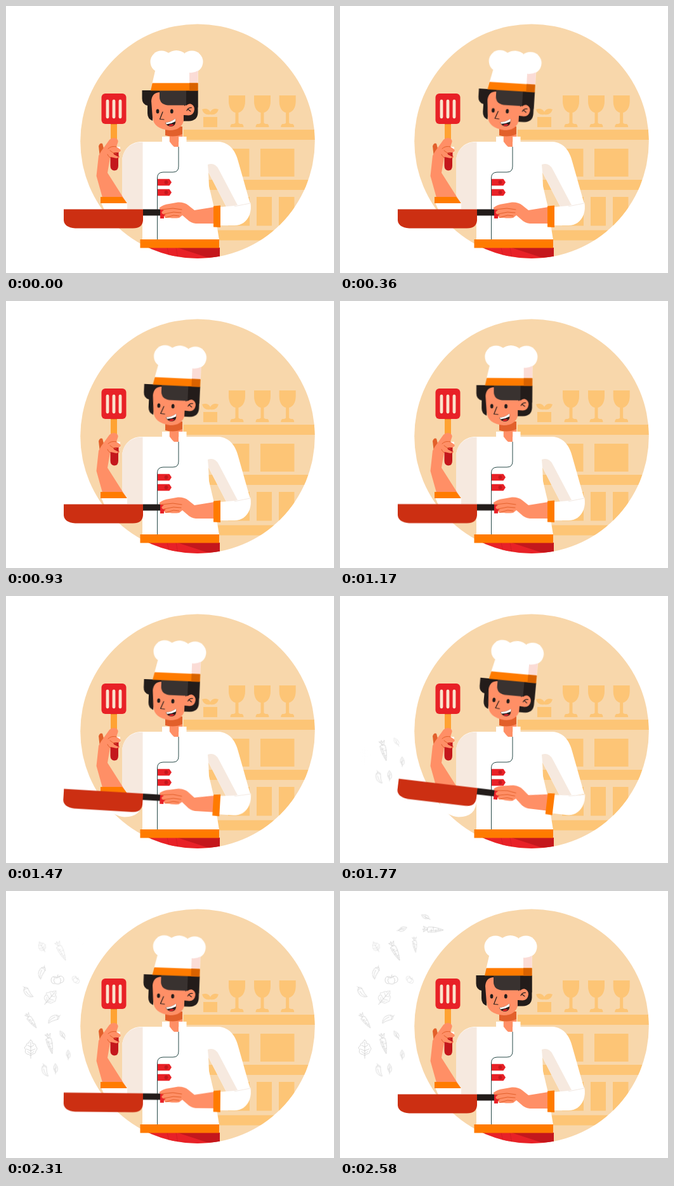
Write an HTML page that moves like this. It is 517 px wide and 421 px high and loops after 3630 ms.

```html
<!DOCTYPE html>
<html lang="en">
<head>
<meta charset="utf-8">
<title>Chef</title>
<style>
html, body { margin: 0; width: 100%; height: 100%; overflow: hidden; background: #fff; }
svg { display: block; width: 100vw; height: 100vh; }
.head, .pan, .herbs { animation: nod 3630ms linear infinite; }
.head { transform-origin: 264px 205px; }
.pan { animation-name: toss; transform-origin: 365px 318px; }
.herbs { animation-name: rise; fill: none; stroke: #c9c9c9; stroke-width: .7; stroke-linecap: round; stroke-linejoin: round; }
.herbs use { opacity: 0; }
@keyframes nod {
  0%, 33.47%, 71.07%, 100% { transform: rotate(0deg); }
  16.53%, 50.41% { transform: rotate(5.85deg); }
}
@keyframes toss {
  0%, 32.1%, 65%, 100% { transform: rotate(0deg); }
  48.76% { transform: rotate(6.8deg); }
}
@keyframes rise {
  0%, 41% { transform: translateY(7px); animation-timing-function: ease-out; }
  61%, 100% { transform: translateY(0); }
}
.skin { fill: #ff8f66; }
.deep { fill: #e2602b; }
.white { fill: #fff; }
.shade { fill: #f6e9df; }
.orange { fill: #ff7b00; }
.red { fill: #e82127; }
.wine { fill: #c4171c; }
.ink { fill: #231c1a; }
.line { fill: none; stroke: #231c1a; stroke-width: 1.2; stroke-linecap: round; stroke-linejoin: round; }
.crease { fill: none; stroke: #e2602b; stroke-width: 1; stroke-linecap: round; }
</style>
</head>
<body>
<svg viewBox="0 0 517 421" preserveAspectRatio="none">
  <defs>
    <clipPath id="disc"><circle cx="302" cy="213.3" r="184.8"/></clipPath>
    <g id="glass">
      <path d="M-13 141H13V150C13 161 8 167 2.5 168V184Q3 186 8 186Q10.500 187 10.500 191H-10.500Q-10.500 187 -8 186Q-3 186 -2.500 184V168C-8 167 -13 161 -13 150Z"/>
    </g>
    <g id="button">
      <path class="red" d="M239 0H257.500L261 5.300L257.500 10.600H239Z"/>
      <circle class="wine" cx="252.500" cy="5.300" r="2.900"/>
    </g>
    <g id="carrot">
      <path d="M-4 -8Q0 -11 4 -8Q5 2 0 16Q-5 2 -4 -8ZM-3 -3H1M4 0H0M-3 4H0M2 8H0M0 -9L-4 -16L-2 -14L0 -17L1 -13L5 -16L2 -9M0 -9V-14M-2 -6L0 12"/>
    </g>
    <g id="chili">
      <path d="M-2 -9Q3 -10 3 -5Q3 4 6 10Q-5 8 -5 -3Q-5 -8 -2 -9ZM-1 -9L-3 -12M-4 -6Q0 -8 3 -6M-2 -3Q-1 4 3 8"/>
    </g>
    <g id="leaf">
      <path d="M0 -8Q5 -2 3 4Q1 7 0 6Q-4 2 -3 -3ZM0 -5V9M0 0L2 -2M0 3L-2 0"/>
    </g>
    <g id="bunch">
      <path d="M0 -14Q4 -12 3 -8Q8 -9 8 -4Q12 0 8 3Q8 8 3 8L0 11Q-3 8 -6 8Q-10 6 -8 1Q-12 -2 -7 -5Q-7 -10 -3 -9Q-4 -12 0 -14ZM0 -11V15M0 -3L5 -6M0 -3L-5 -6M0 3L7 0M0 3L-7 0M0 8L5 4M0 8L-5 4"/>
    </g>
    <g id="pepper">
      <path d="M-1 -4Q-9 -8 -10 0Q-10 7 -3 6Q3 8 5 5Q11 4 10 -2Q8 -8 1 -5ZM-6 -4Q-1 -1 4 -5M-5 -2Q-7 2 -4 5M4 -3Q7 1 4 5M0 -5L1 -8"/>
    </g>
  </defs>

  <g clip-path="url(#disc)">
    <path fill="#f8d7ab" d="M110 20H495V405H110Z"/>
    <g fill="#fdc576">
      <path d="M280 195H490V211H280ZM300 274H490V290H300ZM300 353.500H490V369.500H300Z"/>
      <path d="M350 225H383.500V269H350ZM401 225H454.500V269H401ZM350 301H384V346.500H350ZM395 301H419V346.500H395ZM430 301H454.500V346.500H430Z"/>
      <path d="M311 175H333V191H311ZM322 171Q312 173 309 163Q318 160 322 167Q326 160 335 163Q332 173 322 171Z"/>
      <use href="#glass" x="364"/><use href="#glass" x="404"/><use href="#glass" x="443.700"/>
    </g>
    <path class="red" d="M212 381H337V405H212Z"/>
    <path class="wine" d="M270 381H337V397L316 396Z"/>
    <path d="M229 381L232 398M254 381L258 398M268 381L271 398" fill="none" stroke="#d51d22"/>
  </g>

  <g class="herbs"></g>

  <!-- spatula and raised arm -->
  <path class="white" d="M150 310H192L215 300V322Q215 348 187 348.500Q169 347 160 333Z"/>
  <path class="deep" d="M152 217Q148 215 146 221L148 238L156 232Z"/>
  <path fill="#ffa333" d="M165 184H175V215H165Z"/>
  <path fill="#e98522" d="M165 184H175V187H165Z"/>
  <rect class="red" x="150.500" y="138" width="39" height="48" rx="6"/>
  <path d="M160 150V175M170 150V175M180 150V175" stroke="#fbe3cc" stroke-width="4.800" stroke-linecap="round"/>
  <path class="white" d="M166 222H180V231H166Z"/>
  <path class="skin" d="M150 229L163 211Q168 206 174 209Q178 212 176 216L174 222L180 226Q182 229 178 231L174 233L179 237Q179 241 174 240L164 239L160 263L190.500 311L152 302L142.500 268L146 236Z"/>
  <path class="wine" d="M164.500 238L174 240Q178 240 177 235V252Q177 259.500 170.500 259.500Q164.500 259 164.500 252Z"/>
  <path class="wine" d="M169 231L177.500 231V238L170 234Z"/>
  <path class="crease" d="M174 222Q166 220 161 225M174 233Q168 232 164 228M164 239Q161 237 160 234"/>
  <path class="orange" d="M149 301H183L191 311H149Z"/>

  <!-- jacket -->
  <path class="white" d="M213 214H335C352 215 362 228 366 245L385 312L348 318L319 262L320 284L328 318L336 369H215V322L191 311L183 290V246C183 228 195 214.500 213 214Z"/>
  <path class="shade" d="M215.500 214.500C195 214.500 183 228 183 246V299L191 311V320H215.500Z"/>
  <path class="shade" d="M318 250Q329 246 335 257L365 314L348 318L319 262Z"/>
  <path class="skin" d="M258 192H278V206H272V222H264L258 214Z"/>
  <path class="deep" d="M251 190H278V202Q266 208 251 204Z"/>
  <path class="white" d="M246 206H257.500V222H246ZM272.500 206H284.500V222H272.500ZM256 214L265 222H256Z"/>
  <path d="M272 222V253Q272 262 263 262H248Q238.500 262 238.500 271V368" fill="none" stroke="#294b49"/>
  <use href="#button" y="272.700"/><use href="#button" y="288.700"/>
  <path class="orange" d="M211.500 368H336V381.500H211.500Z"/>

  <g class="head">
    <path class="ink" d="M214.500 133H302.500V168Q302 181 288 181.500H279V160H231V181Q223 178 223 169V157Q214.500 155 214.500 146Z"/>
    <path class="skin" d="M229 150Q230 136 243 136H281V158Q284 154 290 154Q297 156 297 163Q296 172 288 172.500L280 172V181Q276 196 258 196Q233 194 231 176Z"/>
    <path fill="#393230" d="M242 133H284V156.500H255Q242 155 242 143Z"/>
    <path class="ink" d="M284 133H302.500V160L296 155Q289 152 284 157Z"/>
    <ellipse class="ink" cx="239" cy="166" rx="2.400" ry="3.600"/>
    <ellipse class="ink" cx="261.300" cy="166" rx="2.400" ry="3.600"/>
    <path class="line" d="M247 167L242.500 178.500L249 179M285 165Q287 160 292.500 160.500M287 163L291 166"/>
    <path class="ink" d="M251 184Q260 183 267 177.500Q269 190 259 190Q253 189 251 184Z"/>
    <path class="white" d="M251.500 184Q260 183 267 177.500L267 182Q260 186 253 186.500Z"/>
    <path class="red" d="M256 188.500Q260 185 265 187Q261 191 256 188.500Z"/>
    <g class="white">
      <circle cx="245" cy="88" r="17.500"/><circle cx="268.500" cy="90" r="20"/><circle cx="293" cy="88" r="17.500"/>
      <path d="M236 98L230.500 122H302.500V98Z"/>
    </g>
    <path fill="#fbdcd6" d="M289 105Q296 106 302.500 102V122H289Z"/>
    <path class="orange" d="M230.800 121.500H302.500V133.500H228Z"/>
    <path fill="#d96200" d="M289 121.500H302.500V133.500H289Z"/>
  </g>

  <g class="pan">
    <path class="white" d="M337 317L360 315L385.300 310Q387 320 384 329Q377 346 360 346H337Z"/>
    <path d="M360 316L385 311" stroke="#efe3da" stroke-width=".8"/>
    <path fill="#cc2f12" d="M91 320.500H216V338Q215 350.500 200 350.500H109Q92 349 91 338Z"/>
    <path class="ink" d="M216 320.500H244V330.500H216Z"/>
    <path class="red" d="M243 320.500H262V331H249V335H243Z"/>
    <path class="skin" d="M242 318Q248 313 257 312L271 309.500Q281 309 287 314L297 322L328 317V343L299 343Q291 342 285 336L278 330L273 334Q265 335 258 334L251 334Q247 331 252 329L247 328Q243 325 249 322L245 321Q241 320 242 318Z"/>
    <path class="crease" d="M245 321L263 319L277 321M249 328L264 325L276 326M252 333.500L264 330L273 331"/>
    <path class="orange" d="M327 315.500L338 314.500V349L327 348.500Z"/>
  </g>
</svg>
<script>
const loop = 3630, first = 1500, gap = 54, fade = 90;
// shape, x, y, turn, scale: bottom to top
const herbs = [
  ["chili", 61, 283, 0, .9], ["leaf", 78, 280, 0, .95], ["leaf", 98, 258, 0, .9],
  ["carrot", 69, 241, -14, 1], ["leaf", 89, 227, -30, .9], ["bunch", 39, 249, 0, 1],
  ["carrot", 40, 205, -36, .85], ["chili", 75, 201, 78, .95], ["bunch", 70, 168, 40, .95],
  ["chili", 34, 160, -22, .95], ["pepper", 81, 140, 0, 1], ["pepper", 110, 140, 50, .65],
  ["chili", 56, 128, 38, .95], ["bunch", 57, 88, -30, .62], ["carrot", 87, 95, -26, 1],
  ["carrot", 118, 85, -6, .75], ["leaf", 98, 60, 72, .95], ["carrot", 147, 61, -88, 1],
  ["leaf", 135, 41, -62, .9]
];
const box = document.querySelector(".herbs");
herbs.forEach(([shape, x, y, turn, scale], i) => {
  const el = document.createElementNS("http://www.w3.org/2000/svg", "use");
  el.setAttribute("href", "#" + shape);
  el.setAttribute("transform", `translate(${x} ${y}) rotate(${turn}) scale(${scale})`);
  box.append(el);
  const start = first + i * gap;
  el.animate(
    { opacity: [0, 0, 1, 1], offset: [0, start / loop, (start + fade) / loop, 1] },
    { duration: loop, iterations: Infinity }
  );
});
</script>
</body>
</html>
```
